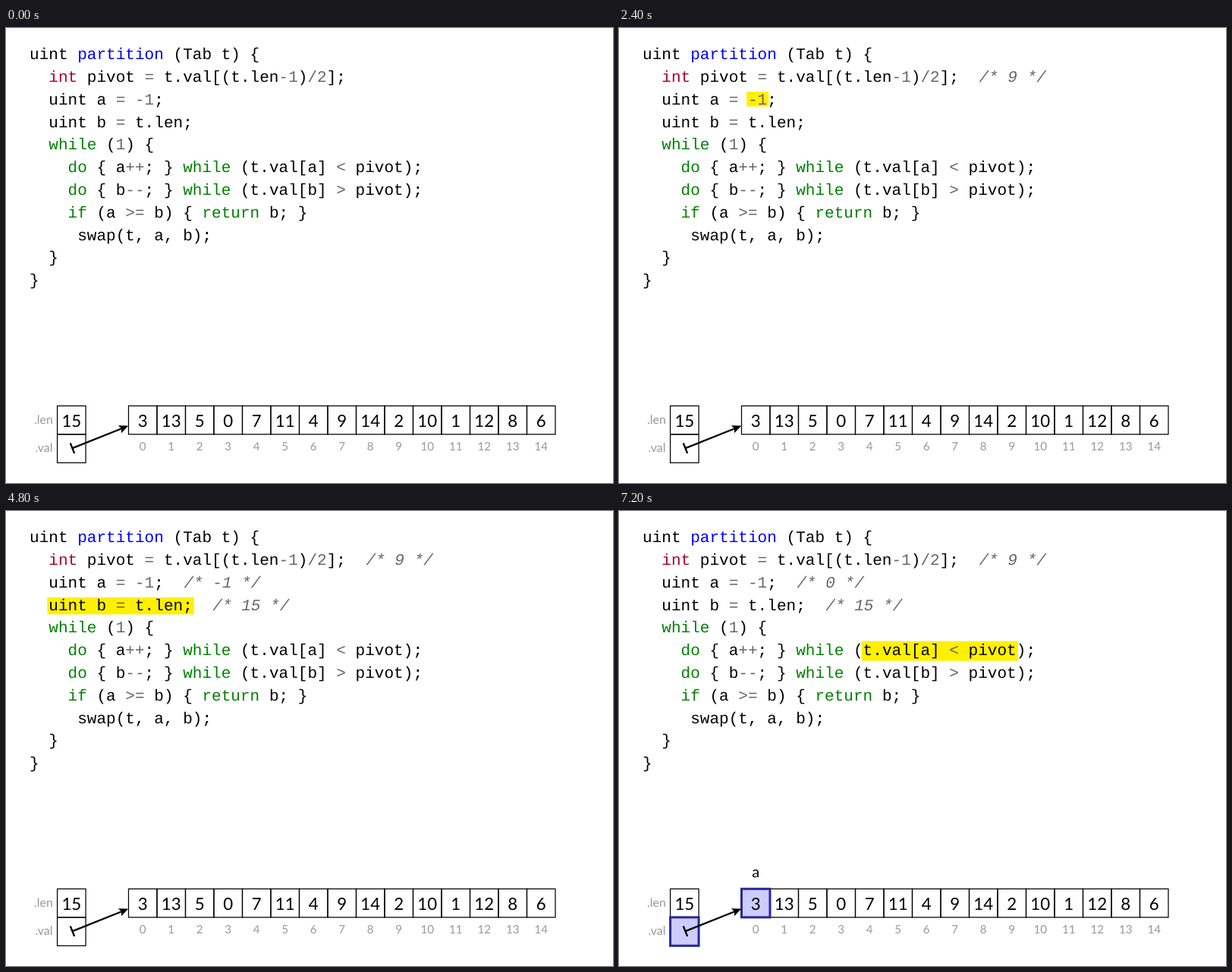
Write an HTML page that moves like this. It is 800 px wide and 600 px high and loops after 8000 ms.

```html
<!DOCTYPE html>
<html lang="en">
<head>
<meta charset="utf-8">
<title>Partition step by step</title>
<style>
  html, body { margin: 0; width: 100%; height: 100%; overflow: hidden; background: #fff; }
  svg { display: block; width: 800px; height: 600px; }
  text { text-rendering: geometricPrecision; white-space: pre; }
  .code { font: 21.05px "Liberation Mono", monospace; }
  .note { font-style: italic; fill: #666; }
  .num { font: 22.3px Lato, sans-serif; text-anchor: middle; }
  .idx { font: 15.2px Lato, sans-serif; text-anchor: middle; fill: #999; }
  .label { font: 16px Lato, sans-serif; text-anchor: end; fill: #999; }
  .mark { font: 20px Lato, sans-serif; text-anchor: middle; }
  .cell { fill: none; stroke: #000; stroke-width: 1.25; }
  .lit { fill: #ccccff; stroke: #292993; stroke-width: 3; }
</style>
</head>
<body>
<svg id="stage" viewBox="0 0 800 600" xmlns="http://www.w3.org/2000/svg"></svg>
<script>
const STEP = 800;
const X0 = 31, PITCH = 12.635, Y0 = 41.2, LEADING = 29.8;
const CELL = 37.5, TAB_X = 161.5, BOX_X = 67.6, TOP = 498.3;

const code = [
  'uint partition (Tab t) {',
  '  int pivot = t.val[(t.len-1)/2];',
  '  uint a = -1;',
  '  uint b = t.len;',
  '  while (1) {',
  '    do { a++; } while (t.val[a] < pivot);',
  '    do { b--; } while (t.val[b] > pivot);',
  '    if (a >= b) { return b; }',
  '     swap(t, a, b);',
  '  }',
  '}'
];
const values = [3, 13, 5, 0, 7, 11, 4, 9, 14, 2, 10, 1, 12, 8, 6];

// mark: [line, text]; lit: boxes shown as read; notes: values of pivot, a, b
const steps = [
  {},
  { mark: [1, 't.val[(t.len-1)/2]'], lit: ['len', 'val', 7] },
  { mark: [1, 'int pivot = t.val[(t.len-1)/2];'], notes: [9] },
  { mark: [2, '-1'], notes: [9] },
  { mark: [2, 'uint a = -1;'], notes: [9, -1] },
  { mark: [3, 't.len'], notes: [9, -1], lit: ['len'] },
  { mark: [3, 'uint b = t.len;'], notes: [9, -1, 15] },
  { mark: [4, '1'], notes: [9, -1, 15] },
  { mark: [5, 'a++;'], notes: [9, 0, 15], a: 0 },
  { mark: [5, 't.val[a] < pivot'], notes: [9, 0, 15], a: 0, lit: ['val', 0] }
];

const stage = document.getElementById('stage');
const colX = col => X0 + col * PITCH;
const lineY = line => Y0 + line * LEADING;

function add(parent, tag, attrs, content) {
  const el = document.createElementNS(stage.namespaceURI, tag);
  for (const key in attrs) el.setAttribute(key, attrs[key]);
  if (content !== undefined) el.textContent = content;
  parent.appendChild(el);
  return el;
}

const label = (parent, cls, x, y, content, fill) =>
  add(parent, 'text', fill ? { class: cls, x, y, fill } : { class: cls, x, y }, content);

function box(parent, cls, id) {
  const x = typeof id === 'number' ? TAB_X + id * CELL : BOX_X;
  const y = id === 'val' ? TOP + CELL : TOP;
  add(parent, 'rect', { class: cls, x, y, width: CELL, height: CELL });
}

function tokenColor(token) {
  if (/^(while|do|if|return)$/.test(token)) return '#008000';
  if (token === 'int') return '#b00028';
  if (token === 'partition') return '#0000ff';
  return /^[-+=<>\/\d]+$/.test(token) ? '#666' : '#000';
}

function drawCode(parent) {
  code.forEach((text, line) => {
    for (const m of text.matchAll(/[A-Za-z]+|\d+|[-+=<>\/]+|[^\sA-Za-z\d+=<>\/-]+/g))
      label(parent, 'code', colX(m.index), lineY(line), m[0], tokenColor(m[0]));
  });
}

function drawTable(parent) {
  box(parent, 'cell', 'len');
  box(parent, 'cell', 'val');
  values.forEach((_, i) => box(parent, 'cell', i));
}

// The arrow runs from the middle of .val towards the middle of cell 0.
function drawArrow(parent) {
  const x = BOX_X + CELL / 2, y = TOP + CELL * 1.5;
  const angle = Math.atan2(-CELL, TAB_X - BOX_X);
  const tip = (TAB_X - x) / Math.cos(angle) - 0.6;
  const arrow = add(parent, 'g', {
    transform: `translate(${x} ${y}) rotate(${angle * 180 / Math.PI})`, stroke: '#000'
  });
  add(arrow, 'path', { d: `M1.2 -6.3V6.3M1.2 0H${tip - 8}`, 'stroke-width': 2.3, 'stroke-linecap': 'round' });
  add(arrow, 'path', { d: `M${tip - 0.7} 0l-10.5 4.6l2.5 -4.6l-2.5 -4.6z`, 'stroke-linejoin': 'round' });
}

function drawLabels(parent) {
  label(parent, 'label', 62, 521.7, '.len');
  label(parent, 'label', 61.5, 559, '.val');
  label(parent, 'num', BOX_X + CELL / 2, 525.6, values.length);
  values.forEach((v, i) => {
    const x = TAB_X + (i + 0.5) * CELL;
    label(parent, 'num', x, 525.6, v);
    label(parent, 'idx', x, 557, i);
  });
  drawArrow(parent);
}

// The marker hugs its text: brackets, tall letters and descenders widen it.
function drawMark(parent, line, text) {
  const col = code[line].indexOf(text);
  const brackets = /[\[(]/.test(text);
  const up = brackets ? 18.6 : /[\dltui]/.test(text) ? 16.7 : 14.3;
  const down = brackets ? 7.4 : /;/.test(text) ? 5.7 : 2.7;
  add(parent, 'rect', {
    x: colX(col) - 1.8, y: lineY(line) - up,
    width: text.length * PITCH + 3.8, height: up + down, fill: '#fff000'
  });
}

const under = add(stage, 'g');
drawCode(stage);
drawTable(stage);
const over = add(stage, 'g');
drawLabels(stage);

function show(step) {
  under.replaceChildren();
  over.replaceChildren();
  if (step.mark) drawMark(under, ...step.mark);
  (step.notes || []).forEach((value, i) => {
    const line = i + 1;
    label(over, 'code note', colX(code[line].length + 2.1), lineY(line), `/* ${value} */`);
  });
  (step.lit || []).forEach(id => box(over, 'lit', id));
  if (step.a !== undefined) label(over, 'mark', TAB_X + (step.a + 0.5) * CELL, 482.5, 'a');
}

let current = -1;
const start = performance.now();
function tick() {
  const next = Math.floor((performance.now() - start) / STEP) % steps.length;
  if (next !== current) show(steps[current = next]);
  requestAnimationFrame(tick);
}
tick();
</script>
</body>
</html>
```
